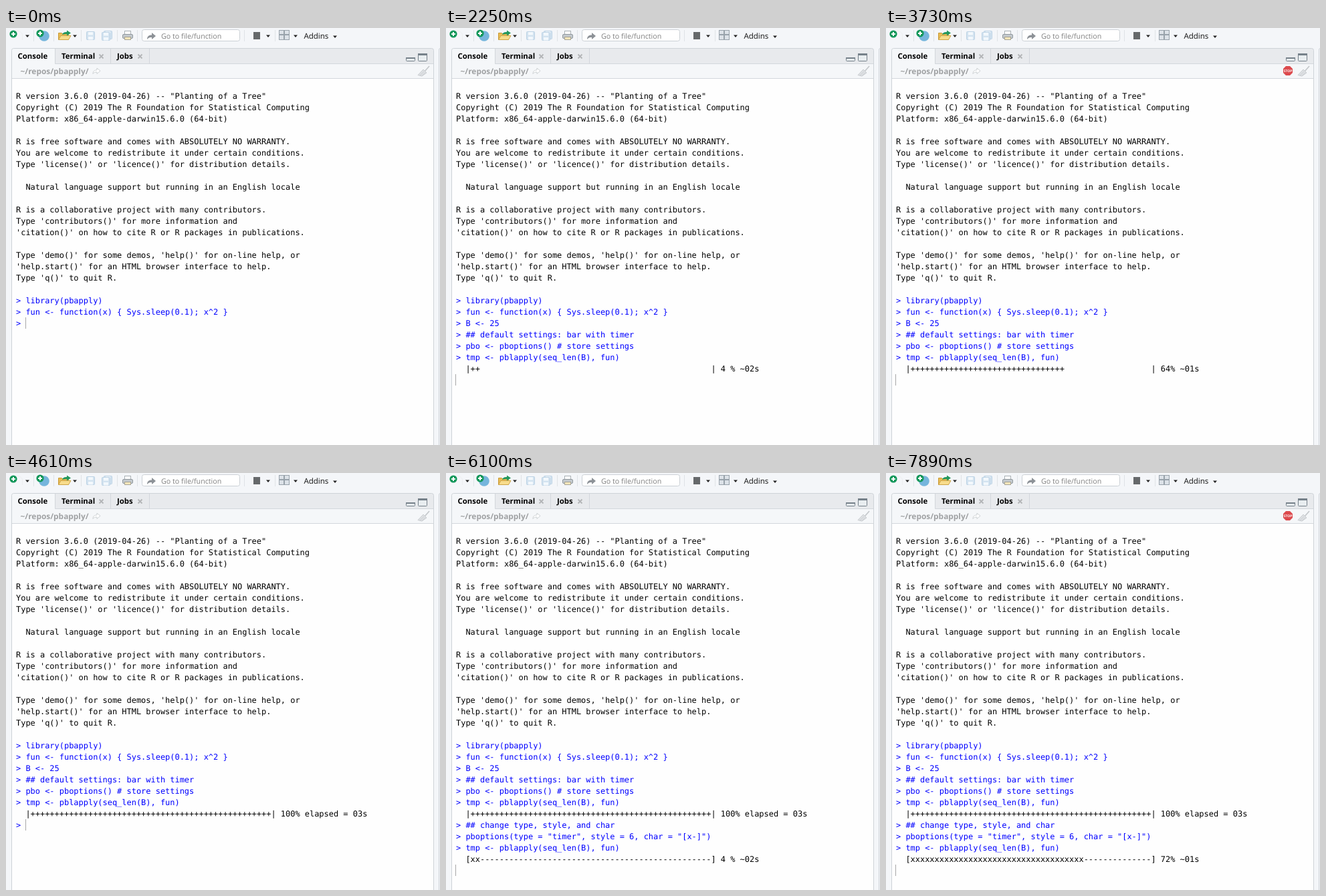
Recreate the animation shown at these times as an HTML page. Size 649x624 px, loop 8000 ms.

```html
<!DOCTYPE html>
<html lang="en">
<head>
<meta charset="utf-8">
<title>Console progress bars</title>
<style>
html, body { margin: 0; width: 100%; height: 100%; overflow: hidden; background: #f4f6f9; }
svg { display: block; }
text { font-family: "Open Sans", sans-serif; text-rendering: geometricPrecision; }
.line { font: 11.96px "DejaVu Sans Mono", monospace; white-space: pre; }
.tab { font-size: 11.4px; font-weight: 700; }
</style>
</head>
<body>
<svg width="649" height="624" viewBox="0 0 649 624">
  <defs>
    <path id="drop" d="M-3 -1.5H3L0 2Z" fill="#222"/>
    <path id="cross" d="M-3 -3L3 3M3 -3L-3 3" stroke="#b3b5b7" stroke-width="1.8"/>
    <g id="plus">
      <circle r="5.6" fill="#12975a"/>
      <path d="M-3 0H3M0 -3V3" stroke="#fff" stroke-width="2"/>
    </g>
    <g id="disk">
      <rect x=".5" y=".5" width="12" height="12" rx="1" fill="#d3e3f0" stroke="#bcd2e4"/>
      <rect x="3" y="1" width="7" height="4.5" fill="#f3f8fc"/>
      <rect x="3" y="8" width="7" height="4.5" fill="#f3f8fc"/>
    </g>
    <path id="jump" d="M0 10C0 5 3 3.5 7 3.5V0L13 5L7 10V7C4 7 2 7.500 0 10Z"/>
  </defs>

  <!-- toolbar -->
  <path d="M12 4.500H20L24.500 9V18" fill="none" stroke="#eceef0"/>
  <use href="#plus" x="11" y="9"/>
  <circle cx="57" cy="12" r="7.8" fill="#75b5dc"/>
  <use href="#plus" x="51" y="8"/>
  <path d="M78.500 17.500V7.500H83L85 9H93.500V17.500Z" fill="#e9bd55" stroke="#c99a35"/>
  <path d="M78.500 17.500L82 11.500H97L93.500 17.500Z" fill="#f8dc8c" stroke="#cda449"/>
  <path d="M84 10C85 6.500 88 6 91 6V3.500L97 7.500L91 11.500V9C88 9 86 9 84 10Z" fill="#23985e"/>
  <use href="#disk" x="120" y="5"/>
  <use href="#disk" x="146" y="4"/>
  <use href="#disk" x="143" y="6"/>
  <rect x="177.500" y="4.500" width="9" height="6" fill="#fff" stroke="#a9b0b5"/>
  <rect x="174.500" y="9.500" width="15" height="6" rx="1.500" fill="#c4cacf" stroke="#90989e"/>
  <rect x="177.500" y="13.500" width="9" height="4" fill="#f4e6bb" stroke="#a8a597"/>
  <path d="M41.500 3V20M71.500 3V20M112.500 3V20M166.500 3V20M196.500 3V20M356.500 3V20M402.500 3V20" stroke="#dfe3e7"/>
  <rect x="203.500" y="2.500" width="146" height="17" rx="3" fill="#fff" stroke="#cbd0d5"/>
  <use href="#jump" x="211" y="7" fill="#8d9297"/>
  <text x="232" y="16" font-size="10.7" fill="#808080">Go to file/function</text>
  <rect x="370" y="6" width="10" height="11" fill="#66696b"/>
  <g fill="#dce2e8" stroke="#98a2ab">
    <rect x="408.500" y="3.500" width="7" height="6"/><rect x="416.500" y="3.500" width="7" height="6"/>
    <rect x="408.500" y="10.500" width="7" height="7"/><rect x="416.500" y="10.500" width="7" height="7"/>
  </g>
  <text x="445.500" y="16" font-size="11.5" fill="#111">Addins</text>
  <use href="#drop" x="32" y="12"/><use href="#drop" x="103" y="12"/><use href="#drop" x="392" y="12"/>
  <use href="#drop" x="433" y="12"/><use href="#drop" x="492" y="13"/>

  <!-- panel -->
  <path d="M8.500 630V33.500Q8.500 30.500 11.500 30.500H636.500Q639.500 30.500 639.500 33.500V630Z" fill="#e8eaed" stroke="#ced3d8"/>
  <path d="M9 76V34Q9 31 12 31H73V54H639V76Z" fill="#f5f7f9"/>
  <path d="M73.500 31V53.500H639M156.500 31V53M214.500 31V53M9 75.500H639" fill="none" stroke="#d3d7dc"/>
  <rect x="9" y="76" width="630" height="548" fill="#fefefe"/>
  <path d="M649 30.500Q647.500 30.500 647.500 33V624" fill="none" stroke="#ced3d8"/>
  <text class="tab" x="17.500" y="46">Console</text>
  <text class="tab" x="83" y="46">Terminal</text>
  <text class="tab" x="166" y="46">Jobs</text>
  <use href="#cross" x="142.500" y="42.500"/><use href="#cross" x="200.500" y="42.500"/>
  <rect x="598.500" y="44.500" width="13" height="5" rx="1" fill="#e8edf0" stroke="#76818a"/>
  <path d="M598 45H612" stroke="#76818a" stroke-width="2"/>
  <rect x="616.500" y="38.500" width="13" height="11" rx="1" fill="#e8edf0" stroke="#76818a"/>
  <path d="M616 39.500H630" stroke="#76818a" stroke-width="3"/>
  <text x="21.500" y="69" font-size="11.9" font-weight="700" fill="#a0a2a4">~/repos/pbapply/</text>
  <use href="#jump" transform="translate(130 60) scale(.85)" fill="#fff" stroke="#c6cacd"/>
  <path d="M633 57L626 65" stroke="#c3c7ca" stroke-width="1.6"/>
  <path d="M624 62L629 67L622 72L616 70.500Z" fill="#dee1e4" stroke="#c9cdd0"/>
  <path d="M619 71L625 65M622 71.500L627 66.500" stroke="#c5c9cc" stroke-width=".7"/>
  <g id="stop">
    <path d="M598 57H604L608 61V67L604 71H598L594 67V61Z" fill="#dc4a4d"/>
    <text x="601" y="66" font-size="5" font-weight="700" text-anchor="middle" fill="#fff">STOP</text>
  </g>
  <g id="out"></g>
  <path id="caret" d="M.5 0V17" stroke="#a8a8a8"/>
</svg>
<script>
const LOOP = 8000, STEP = 148, ITEM = 104, WIDTH = 50;
const NS = 'http://www.w3.org/2000/svg';
const $ = id => document.getElementById(id);

const banner = `R version 3.6.0 (2019-04-26) -- "Planting of a Tree"
Copyright (C) 2019 The R Foundation for Statistical Computing
Platform: x86_64-apple-darwin15.6.0 (64-bit)

R is free software and comes with ABSOLUTELY NO WARRANTY.
You are welcome to redistribute it under certain conditions.
Type 'license()' or 'licence()' for distribution details.

  Natural language support but running in an English locale

R is a collaborative project with many contributors.
Type 'contributors()' for more information and
'citation()' on how to cite R or R packages in publications.

Type 'demo()' for some demos, 'help()' for on-line help, or
'help.start()' for an HTML browser interface to help.
Type 'q()' to quit R.
`.split('\n');

const run = 'tmp <- pblapply(seq_len(B), fun)';
// [time, command, bar settings]
const script = [
  [0, 'library(pbapply)'],
  [0, 'fun <- function(x) { Sys.sleep(0.1); x^2 }'],
  [450, 'B <- 25'],
  [1350, '## default settings: bar with timer'],
  [1350, 'pbo <- pboptions() # store settings'],
  [2250, run, { end: 4610, chars: '|+ |', lead: 85, late: 12 }],
  [5210, '## change type, style, and char'],
  [5360, 'pboptions(type = "timer", style = 6, char = "[x-]")'],
  [6100, run, { end: 9000, chars: '[x-]', lead: 40, late: 11 }]
];

function barText(age, bar, done) {
  const n = done ? 25 : Math.min(25, 1 + Math.floor((age + bar.lead) / ITEM));
  const [open, full, empty, close] = bar.chars;
  const label = done ? '100% elapsed = 03s'
    : String(n * 4).padEnd(2) + '% ~0' + (n < bar.late ? 2 : 1) + 's';
  return '  ' + open + full.repeat(n * 2) + empty.repeat(WIDTH - n * 2) + close + ' ' + label;
}

const rows = [];
function setRow(i, str) {
  if (!rows[i]) {
    rows[i] = document.createElementNS(NS, 'text');
    rows[i].setAttribute('class', 'line');
    rows[i].setAttribute('x', 15);
    rows[i].setAttribute('y', 106 + 17 * i);
    $('out').appendChild(rows[i]);
  }
  if (rows[i].textContent === str) return;
  rows[i].textContent = str;
  rows[i].setAttribute('fill', str[0] === '>' ? '#0000ff' : '#000');
}

function draw(t) {
  const lines = banner.slice();
  let busy = false, fade = 0;
  for (const [at, cmd, bar] of script) {
    if (t < at) break;
    lines.push('> ' + cmd);
    if (!bar) continue;
    const age = Math.floor((t - at + 8) / STEP) * STEP;
    busy = t < bar.end;
    lines.push(barText(age, bar, !busy));
    fade = busy ? Math.max(0, Math.min(1, (age - 560) / 300)) : 0;
  }
  const last = lines.length;
  lines.push(busy ? '' : '> ');
  for (let i = 0; i < Math.max(lines.length, rows.length); i++) setRow(i, lines[i] || '');
  $('caret').setAttribute('transform', `translate(${busy ? 14 : 29} ${93 + 17 * last})`);
  $('stop').setAttribute('opacity', fade);
}

let start;
function tick(now) {
  start ??= now;
  draw((now - start) % LOOP);
  requestAnimationFrame(tick);
}
draw(0);
requestAnimationFrame(tick);
</script>
</body>
</html>
```
